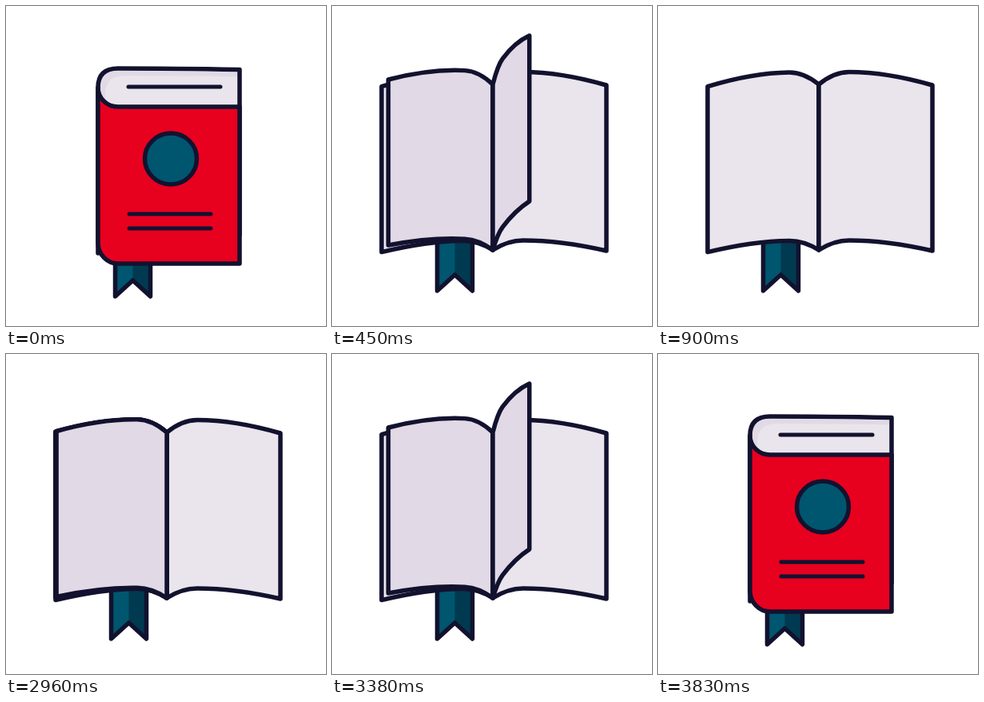
An HTML page that plays this animation: 400x400 px, repeating every 4.36 s.

```html
<!DOCTYPE html>
<html lang="en">
<head>
<meta charset="utf-8">
<title>Book</title>
<style>
html, body { margin: 0; height: 100%; overflow: hidden; background: #fff; }
svg { display: block; width: 100vw; height: 100vh; }
path, ellipse { vector-effect: non-scaling-stroke; }
</style>
</head>
<body>
<svg id="stage" viewBox="0 0 400 400" stroke-linejoin="round" stroke-linecap="round"></svg>
<script>
const INK = '#12122f', RED = '#e8001f', TEAL = '#00566e', DEEP = '#003a50';
const PAPER = '#eae5ec', SHADE = '#e1d9e5';
const STEP = 30, LAST = 30, CLOSE_AT = 2960, LOOP = 4360;
const HEIGHT = 207, SHEETS = 3, OPENING = 12;

const stage = document.getElementById('stage');
const clamp = v => Math.min(1, Math.max(0, v));
const smooth = v => v * v * (3 - 2 * v);
const mix = (a, b, k) => a + (b - a) * k;
const mixPt = (a, b, k) => a.map((v, i) => mix(v, b[i], k));

const path = (d, fill = 'none', width = 5.5) =>
  `<path d="${d}" fill="${fill}"` + (width ? ` stroke="${INK}" stroke-width="${width}"` : '') + '/>';

// Top edge of the resting right sheet: spine, control, crest, control, tip.
function restingEdge(p) {
  const spine = mixPt([115, 102], [201, 98], p);
  const crest = mixPt([140, 78], [239, 82.5], p);
  const tip = mixPt([292, 79.5], [343, 99], p);
  return [
    spine, [mix(spine[0], crest[0], p / 2), crest[1]],
    crest, [mix(crest[0], tip[0], 0.45), crest[1]], tip
  ];
}

// Apply fn(x, y, s) to every point; s runs from 0 at the spine to 1 at the tip.
function mapEdge(edge, fn) {
  const x0 = edge[0][0], span = edge[4][0] - x0;
  return edge.map(([x, y]) => fn(x, y, (x - x0) / span));
}

// Turn about the spine: c = 1 lies right, -1 lies left; lift raises the tip.
const turn = (edge, c, lift) =>
  mapEdge(edge, (x, y, s) => [mix(edge[0][0], x, c), y - lift * s]);

// The lower edge repeats the upper one, a little flatter at the crest.
function sheetPath(top, height = HEIGHT) {
  const low = top.map(([x, y], i) => [x, y + height + (i % 4 ? 3.5 : 0)]);
  const [a, b, c, d, e] = top, [f, g, h, i, j] = low;
  return `M${a}Q${b} ${c}Q${d} ${e}L${j}Q${i} ${h}Q${g} ${f}Z`;
}

function ribbon(p) {
  const mid = mix(158.5, 153.5, p) + 11 * Math.sin(Math.PI * p);
  const half = 22 * Math.max(0.2, Math.abs(1 - 2 * p));
  const l = mid - half, r = mid + half;
  const top = mix(318, 288, p), low = mix(363, 356, p), notch = low - 20;
  const shape = `M${l} ${top}V${low}L${mid} ${notch}L${r} ${low}V${top}Z`;
  return path(shape, TEAL, 0) +
    path(`M${mid} ${top}V${notch}L${r} ${low}V${top}Z`, DEEP, 0) + path(shape);
}

function rightSheet(edge, p) {
  const inset = 9 * Math.min(1, 2 - 2 * p);
  const inner = mapEdge(edge, (x, y, s) => [x + inset * (1 - s), y + inset]);
  return path(sheetPath(edge), SHADE, 0) +
    path(sheetPath(inner, HEIGHT - inset), PAPER, 0) + path(sheetPath(edge));
}

// Drawn shut, then squeezed and sheared while it swings towards the viewer.
function frontCover(p, spineX, freeX) {
  const q = 2 * p, squeeze = (freeX - spineX) / 177, shear = 22 * q / 177;
  const matrix = [squeeze, shear, 0, 1, spineX - 115 * squeeze, -15 * q - 115 * shear];
  const thin = mix(5, 3.5, q);
  return `<g transform="matrix(${matrix})">` +
    path('M115 102A25 24 0 0 0 140 126H292V322H140A25 26 0 0 1 115 296Z', RED) +
    `<ellipse cx="206" cy="191" rx="32.5" ry="32" fill="${TEAL}" stroke="${INK}" stroke-width="${mix(5.5, 2.5, q)}"/>` +
    path('M154 260H256M154 278H256', 'none', thin) + '</g>';
}

function titleLine(p) {
  const from = mixPt([153, 101], [190, 81], 2 * p);
  const to = mixPt([268, 101], [300, 85], 2 * p);
  return path(`M${from}L${to}`, 'none', 5);
}

function turningSheet(n, index, edge) {
  const t = clamp((n - 5.6 - 6.5 * index) / 11);
  if (!t) return '';
  const c = 1 - 1.98 * smooth(t ** 0.7);
  const lift = 63 * (1 - c * c) * (1 + 0.3 * c);
  return path(sheetPath(turn(edge, c, lift)), SHADE);
}

function draw(n) {
  const p = smooth(clamp(n / OPENING));
  const edge = restingEdge(p);
  const spineX = edge[0][0], freeX = mix(292, 62, p);
  let out = ribbon(p);
  if (p > 0.5) {
    const c = (freeX - spineX) / (edge[4][0] - spineX);
    out += path(sheetPath(turn(edge, c, -38 * (1 - c * c))), PAPER);
  }
  out += rightSheet(edge, p);
  if (n < LAST) {
    for (let i = 0; i < SHEETS; i++) out += turningSheet(n, i, edge);
  }
  if (p <= 0.5) out += frontCover(p, spineX, freeX) + titleLine(p);
  stage.innerHTML = out;
}

function stepAt(t) {
  if (t < CLOSE_AT) return Math.min(LAST, Math.floor(t / STEP));
  return Math.max(0, LAST - 1 - Math.floor((t - CLOSE_AT) / STEP));
}

let begin = null, shown = 0;
function tick(now) {
  if (begin === null) begin = now;
  const n = stepAt((now - begin) % LOOP);
  if (n !== shown) draw(shown = n);
  requestAnimationFrame(tick);
}
draw(0);
requestAnimationFrame(tick);
</script>
</body>
</html>
```
